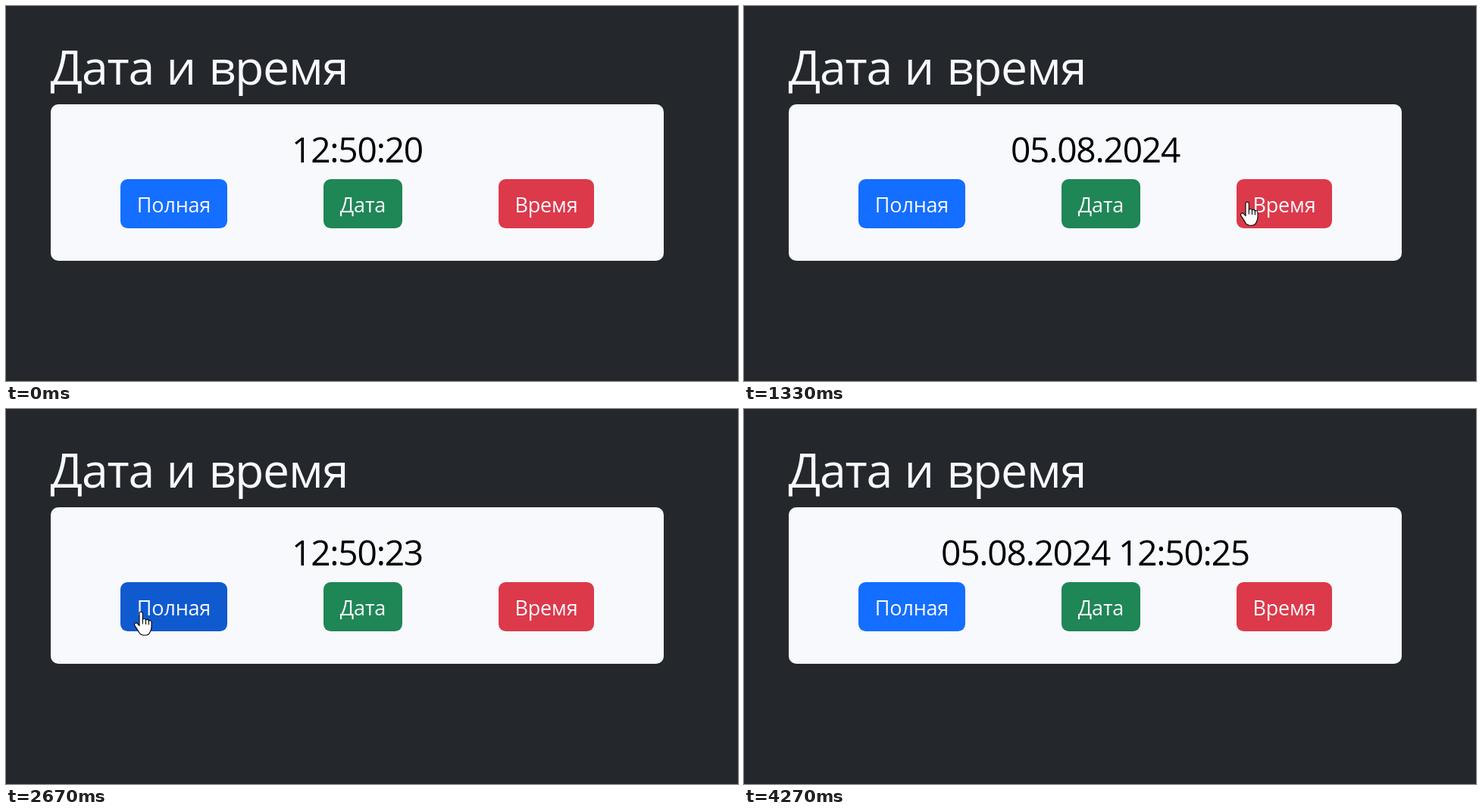
These frames come from a looping animation (966 px wide and 496 px high, 4470 ms). An HTML page:

```html
<!DOCTYPE html>
<html lang="ru">
<head>
<meta charset="utf-8">
<title>Дата и время</title>
<style>
  html, body { margin: 0; width: 100%; height: 100%; overflow: hidden; background: #24272c; }
  svg { display: block; width: 966px; height: 496px; }
  text { font-family: "Open Sans", "Noto Sans", sans-serif; }
  .title { font-size: 62.5px; letter-spacing: -1.2px; fill: #f8f9fd; }
  .clock { font-size: 46px; letter-spacing: -1.17px; text-anchor: middle; fill: #000; }
  .label { font-size: 27px; letter-spacing: -.2px; text-anchor: middle; fill: #f8f9fd; }
  #cursor path { fill: #fff; stroke: #000; stroke-width: 1.1; stroke-linejoin: round; stroke-linecap: round; }
</style>
</head>
<body>
<svg viewBox="0 0 966 496">
  <text class="title" y="104"><tspan x="58.5">Дата</tspan><tspan x="211.6">и</tspan><tspan x="267.6">время</tspan></text>
  <rect x="59" y="130" width="809" height="207" rx="10" fill="#f8f9fd"/>
  <text class="clock" id="clock" x="463.5" y="207"></text>
  <g id="buttons"></g>
  <g id="cursor">
    <path id="arrow" d="M.5 .5V24.3l5.2-4.9 3.7 7.8 4-1.8-3.8-7.4h7.9z"/>
    <g id="hand" transform="translate(1 0)">
      <path d="M-2 2.2C-2 -.4 2.3 -.4 2.3 2.2V11C2.6 9 6.4 9 6.5 11.4C7 9.8 10.2 10 10.4 12.4C11 11 14 11.4 14 14V20C14 24 12.6 25.5 11.6 28C10.5 30.6 8 31.2 5 31.2C1 31.2 -1 30.5 -2.4 27.5C-3.8 24.5 -6 21.5 -8 18.6C-9.6 16 -6.6 13.6 -4.4 16L-2 18.6Z"/>
      <path d="M2.3 11V16M6.5 11.4V16.4M10.4 12.4V17"/>
    </g>
  </g>
</svg>
<script>
const LOOP = 4470, STEP = 200 / 3, HOLD = 170, TOP = 229, BOTTOM = 294;
const NS = 'http://www.w3.org/2000/svg';
const $ = id => document.getElementById(id);

const buttons = [
  { x: 151, w: 141, label: 'Полная', color: [20, 110, 255] },
  { x: 419, w: 104, label: 'Дата', color: [31, 134, 86] },
  { x: 650, w: 126, label: 'Время', color: [220, 57, 74] }
];

const entry = { x: 500, y: 500 };
const moves = [
  { from: 0, to: 600, x: 458, y: 240 },
  { from: 1000, to: 1465, x: 709, y: 260 },
  { from: 2035, to: 2600, x: 177, y: 268 },
  { from: 3380, to: 3560, x: 184, y: 271 },
  { from: 3560, to: 3870, x: 240, y: 500 }
];

const clicks = [
  { at: 630, show: (date, time) => date },
  { at: 1560, show: (date, time) => time },
  { at: 2560, show: (date, time) => `${date} ${time}` }
];

function add(parent, tag, attrs) {
  const el = document.createElementNS(NS, tag);
  for (const key in attrs) el.setAttribute(key, attrs[key]);
  return parent.appendChild(el);
}

for (const b of buttons) {
  b.rect = add($('buttons'), 'rect', { x: b.x, y: TOP, width: b.w, height: BOTTOM - TOP, rx: 9.5 });
  add($('buttons'), 'text', { class: 'label', x: b.x + b.w / 2, y: 273 }).textContent = b.label;
}

const ease = k => (1 - Math.cos(Math.PI * k)) / 2;

// wide sweeps of the pointer sag a little
function pointer(t) {
  let { x, y } = entry;
  for (const m of moves) {
    if (t < m.from) break;
    const k = ease(Math.min(1, (t - m.from) / (m.to - m.from)));
    const dx = m.x - x;
    x += dx * k;
    y += (m.y - y) * k + Math.abs(dx) * .02 * Math.sin(Math.PI * k);
  }
  return { x: Math.round(x), y: Math.round(y) };
}

const over = (b, p) => p.x >= b.x && p.x < b.x + b.w && p.y >= TOP && p.y < BOTTOM;

function shade(b, t) {
  if (!over(b, pointer(t))) return 1;
  return clicks.some(c => t >= c.at && t < c.at + HOLD) ? .8 : .85;
}

// the mean of recent shades gives the soft fade
function fill(b, t) {
  const k = (shade(b, t - 50) + shade(b, t - 100) + shade(b, t - 150)) / 3;
  return `rgb(${b.color.map(c => Math.round(c * k))})`;
}

function reading(t) {
  const seconds = 20 + Math.floor((t + 890) / 1005);
  const last = clicks.findLast(c => t >= c.at + HOLD) || clicks[1];
  return last.show('05.08.2024', `12:50:${seconds}`);
}

function draw(now) {
  // 15 pictures a second
  const t = Math.floor((now % LOOP + 5) / STEP) * STEP;
  const p = pointer(t);
  const hot = buttons.some(b => over(b, p));
  $('clock').textContent = reading(t);
  for (const b of buttons) b.rect.setAttribute('fill', fill(b, t));
  $('cursor').setAttribute('transform', `translate(${p.x} ${p.y})`);
  $('hand').style.display = hot ? '' : 'none';
  $('arrow').style.display = hot ? 'none' : '';
}

const begin = performance.now();
function tick() {
  draw(performance.now() - begin);
  requestAnimationFrame(tick);
}
tick();
</script>
</body>
</html>
```
